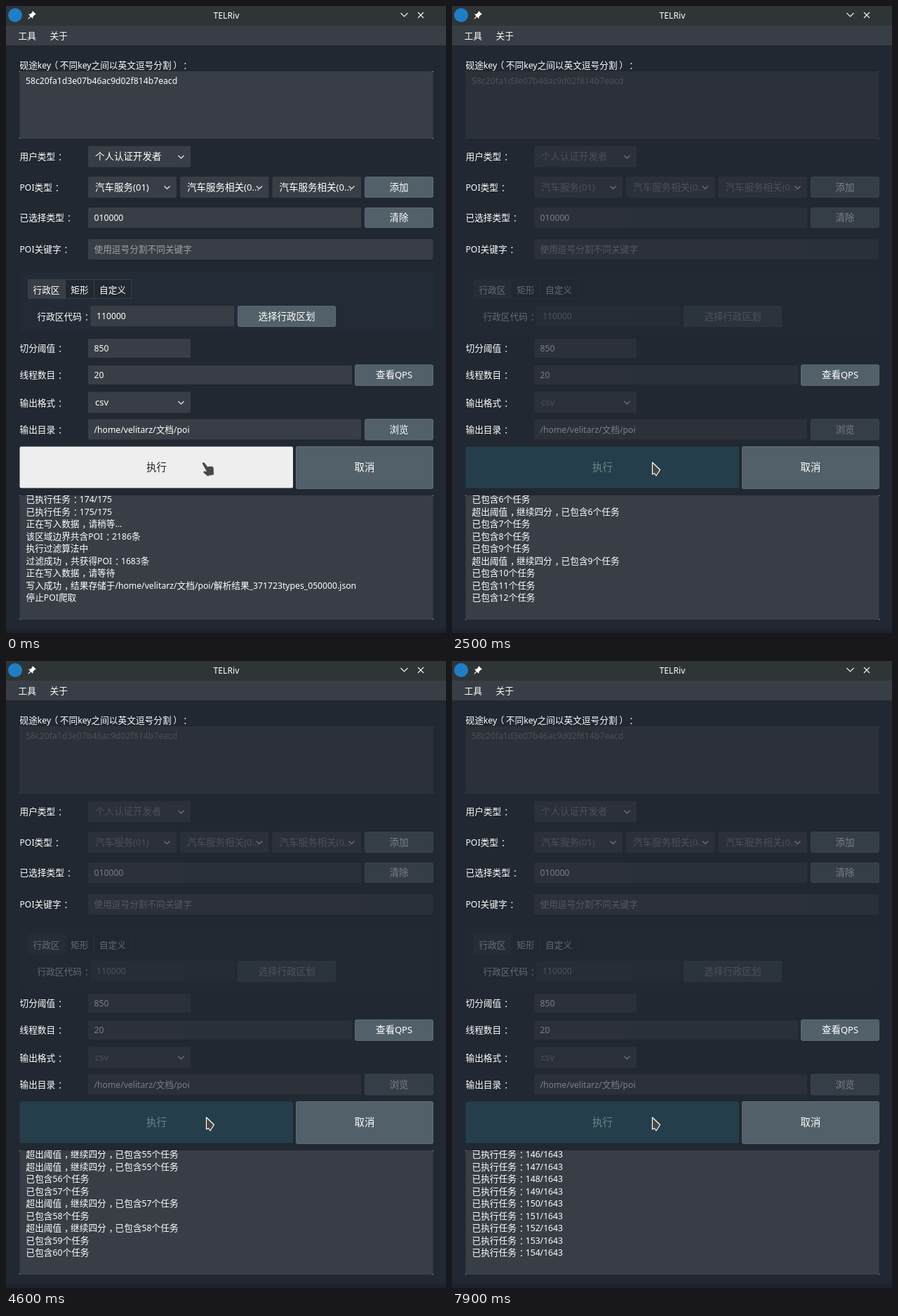
Animation of 627 by 893 pixels, one loop 8000 ms. Source, as an HTML page:

```html
<!DOCTYPE html>
<html lang="zh-CN">
<head>
<meta charset="utf-8">
<title>TELRiv</title>
<style>
html, body { margin: 0; width: 100%; height: 100%; overflow: hidden; background: #222831; }
svg { display: block; width: 627px; height: 893px; }
text {
  font: 12.2px "Noto Sans", "Noto Sans CJK SC", "Noto Sans CJK JP", sans-serif;
  fill: #fff; white-space: pre;
  text-spacing-trim: space-all; text-autospace: no-autospace;
}
.han { font-size: 1.04em; }
.mid { text-anchor: middle; }
.control { font-size: 13px; }
.big { font-size: 13.85px; }
.hint { fill: #a0a3a6; }
.field { fill: #393e46; }
.button { fill: #526069; stroke: #5d6b75; }
.corners { fill: #c4c6c8; }
.line { fill: none; stroke: #eee; stroke-width: 1.2; }
.run { fill: #eee; }
.runText { fill: #222; }
.arrow { display: none; }
.busy .dim, .busy .faint { opacity: .4; }
.busy .panel { opacity: .19; }
.busy .panelLabel { opacity: .3; }
.busy .run { fill: #243f4b; }
.busy .runText { fill: #74838b; }
.moved .hand { display: none; }
.moved .arrow { display: inline; }
</style>
</head>
<body>
<svg id="stage" viewBox="0 0 627 893" xmlns="http://www.w3.org/2000/svg"></svg>
<script>
const stage = document.getElementById('stage');

// Han text runs slightly larger than Latin; full-width marks sit mid-cell.
const markShift = { '，': .3, '：': .3, '（': -.2, '）': .2 };
const typeset = s => s
  .replace(/[^\x00-\xff，：（）]+/g, '<tspan class="han">$&</tspan>')
  .replace(/([，：（）])([^，：（）]*)/g, (_, mark, rest) =>
    `<tspan class="han" dx="${markShift[mark]}em">${mark}</tspan>`
    + `<tspan dx="${-markShift[mark]}em">${rest || '\u200b'}</tspan>`);

const text = (s, x, y, cls = '') =>
  `<text x="${x}" y="${y + 4.5}" class="${cls}">${typeset(s)}</text>`;
const rect = (x, y, w, h, cls = 'field', r = 2) =>
  `<rect x="${x}" y="${y}" width="${w}" height="${h}" rx="${r}" class="${cls}"/>`;
const group = (cls, ...parts) => `<g class="${cls}">${parts.join('')}</g>`;
const chevron = (x, y, r = 4) =>
  `<path class="line" d="M${x - r} ${y - r / 2}l${r} ${r}l${r} ${-r}"/>`;

const label = (s, y) => text(s, 19.5, y);
const area = (y, h) => rect(19.5, y, 589, h)
  + `<path class="corners" d="M19 ${y}h1v1h-1zM608 ${y}h1v1h-1zM19 ${y + h - 1}h1v1h-1zM608 ${y + h - 1}h1v1h-1z"/>`;
const input = (s, x, y, w, h, cls = 'dim', textCls = '') =>
  group(cls, rect(x, y, w, h), text(s, x + 8.5, y + h / 2, textCls));
const button = (s, x, y, w, h, cls = 'dim', size = 'control') =>
  group(cls, rect(x, y, w, h, 'button'), text(s, x + w / 2, y + h / 2, 'mid ' + size));
const combo = (s, x, y, w) =>
  group('dim', rect(x, y, w, 30), text(s, x + 10, y + 15, 'control faint'),
    chevron(x + w - 13.5, y + 15.5));
const tab = (s, x, w, on) =>
  `<rect x="${x + .5}" y="389.5" width="${w - 1}" height="27" fill="${on ? '#393e46' : '#222831'}" stroke="#393e46" class="panel"/>`
  + text(s, x + w / 2, 404, 'mid panelLabel');

const titleBar = `
  <rect width="627" height="28" fill="#2f3437"/>
  <rect y="28" width="627" height="28" fill="#393e46"/>
  <rect y="887" width="627" height="6" fill="#1f212c"/>
  <circle cx="13" cy="13" r="10" fill="#1f7fc4"/>
  <path d="M38 7l5 5-2 .6-2.500 2.500-.3 3-2.700-2.700-3.700 3.400-.6-.6 3.400-3.700-2.700-2.700 3-.3 2.500-2.500z" fill="#fff"/>
  <path class="line" d="M587 9l8 8m0-8l-8 8"/>`
  + chevron(567.5, 12.5, 5) + text('TELRiv', 314, 13, 'mid')
  + text('工具', 17.5, 42) + text('关于', 62.5, 42);

const form = [
  label('砚途key（不同key之间以英文逗号分割）：', 84),
  group('dim', area(93, 96), text('58c20fa1d3e07b46ac9d02f814b7eacd', 28, 106, 'faint')),
  label('用户类型：', 214.5), combo('个人认证开发者', 117, 199.5, 146),
  label('POI类型：', 258), combo('汽车服务(01)', 117, 243, 126),
  combo('汽车服务相关(0...', 248, 243, 126.5), combo('汽车服务相关(0...', 379.5, 243, 126.5),
  button('添加', 511.5, 243.5, 97, 29),
  label('已选择类型：', 301.5), input('010000', 117, 287, 389, 29), button('清除', 511.5, 287.5, 97, 28),
  label('POI关键字：', 346.5), input('使用逗号分割不同关键字', 117, 332, 491.5, 29, 'dim', 'hint'),
  '<rect x="20" y="379" width="588" height="84" fill="#232c36" class="dim"/>',
  tab('行政区', 31, 53, true), tab('矩形', 84, 42), tab('自定义', 125, 54),
  text('行政区代码：', 44.5, 442, 'panelLabel'),
  input('110000', 120.5, 427, 204.5, 29, 'panel'),
  button('选择行政区划', 330.5, 427.5, 139, 29, 'panel'),
  label('切分阈值：', 487.5), input('850', 117, 474, 146, 27),
  label('线程数目：', 525.5), input('20', 117, 512, 376, 27),
  button('查看QPS', 497.5, 511, 111, 29.5, ''),
  label('输出格式：', 565), combo('csv', 117, 549.5, 146),
  label('输出目录：', 603.5), input('/home/velitarz/文档/poi', 117, 588.5, 389, 29),
  button('浏览', 511.5, 588.5, 97, 29.5),
  rect(19.5, 627.5, 389.5, 59, 'run'), text('执行', 214.5, 657, 'mid big runText'),
  button('取消', 413.5, 627.5, 195, 60, '', 'big'),
  area(697, 177)
].join('');

const pointers = `
  <path class="hand" fill="#48484b" stroke="#f8f8f8" stroke-width=".6"
    d="M280 650.500q1.500-1.700 3 0l4.300 5.500 4.700-.8q3.500-.3 4 3l.4 9.500-9.400 2-5.500-4.700q-1.500-2.200 1-2.800l3 .5-5.600-10.200q-.7-1.200.1-2z"/>
  <path class="arrow" fill="#494541" stroke="#fff" stroke-width="1.2" stroke-linejoin="round"
    d="M285.500 650V667L288.500 665.500L291 669L296.500 660.500Z"/>`;

const rows = Array.from({ length: 9 }, (_, i) => text('', 28.5, 702.5 + i * 17.5)).join('');
stage.innerHTML = titleBar + form
  + `<clipPath id="view"><rect x="20" y="697" width="588" height="176"/></clipPath>`
  + `<g id="rows" clip-path="url(#view)">${rows}</g>` + pointers;
const rowNodes = [...document.getElementById('rows').children];

// The whole log; the view shows the nine lines up to the current end.
const has = n => `已包含${n}个任务`;
const over = n => `超出阈值，继续四分，${has(n)}`;
const done = (n, all = 1643) => `已执行任务：${n}/${all}`;

const stopped = '停止POI爬取', meshing = '划分所有任务网格中';
const probed = '用于额外探测的请求有 125 次', meshed = '任务网格切分成功，共有94个任务网格';
const started = '开始POI爬取， POI类型：010000';

const splits = [0, 0, 0, 0, 0, 3, 6, 9, 12, 15, 18, 21, 23, 24, 25, 26, 26,
  29, 33, 37, 41, 45, 49, 52, 55, 55, 57, 58, 64, 69, 73];
const log = [
  done(174, 175), done(175, 175), '正在写入数据，请稍等...', '该区域边界共含POI：2186条',
  '执行过滤算法中', '过滤成功，共获得POI：1683条', '正在写入数据，请等待',
  '写入成功，结果存储于/home/velitarz/文档/poi/解析结果_371723types_050000.json', stopped,
  '读取POI关键字中', 'POI关键字读取成功', '读取POI类型中', 'POI类型读取成功',
  '您是个人认证开发者', '开始POI爬取，请勿操作', '获取行政区 110000 区域边界中',
  '成功获取行政区 110000:北京市 区域边界', meshing
];
for (let n = 0; n <= 94; n++) {
  if (n) log.push(has(n));
  splits.filter(k => k === n).forEach(() => log.push(over(n)));
}
log.push(probed, meshed, '任务构建成功，共有1643个任务，还有1549个任务等待完成', started);
for (let n = 95; n <= 154; n++) log.push(done(n));

// [time, last visible line, lines past it]
const steps = [
  [0, stopped], [600, meshing], [1400, meshing, 1], [1800, meshing, 3], [1900, meshing, 5],
  [2300, has(4)], [2400, has(8)], [2500, has(12)], [3000, over(21)],
  [3300, over(26)], [3500, over(26), 1], [3800, has(33)], [3900, has(36)],
  [4200, has(43)], [4300, has(47)], [4400, has(52)], [4600, has(60)],
  [4700, has(63)], [4800, has(67)], [5100, has(71)], [5200, has(74)], [5300, has(77)],
  [5600, has(84)], [6000, has(91)], [6100, probed], [6300, meshed], [6400, started],
  [6900, done(112)], [7300, done(122)], [7400, done(127)], [7500, done(132)],
  [7700, done(140)], [7800, done(147)], [7900, done(154)]
].map(([time, line, past = 0]) => ({ time, end: log.indexOf(line) + past }));

let shown = -1;
function draw() {
  const t = performance.now() % 8000;
  stage.classList.toggle('moved', t >= 200);
  stage.classList.toggle('busy', t >= 600);
  const { end } = steps.findLast(s => s.time <= t);
  if (end !== shown) {
    shown = end;
    rowNodes.forEach((node, i) => node.innerHTML = typeset(log[end - 8 + i]));
  }
  requestAnimationFrame(draw);
}
draw();
</script>
</body>
</html>
```
